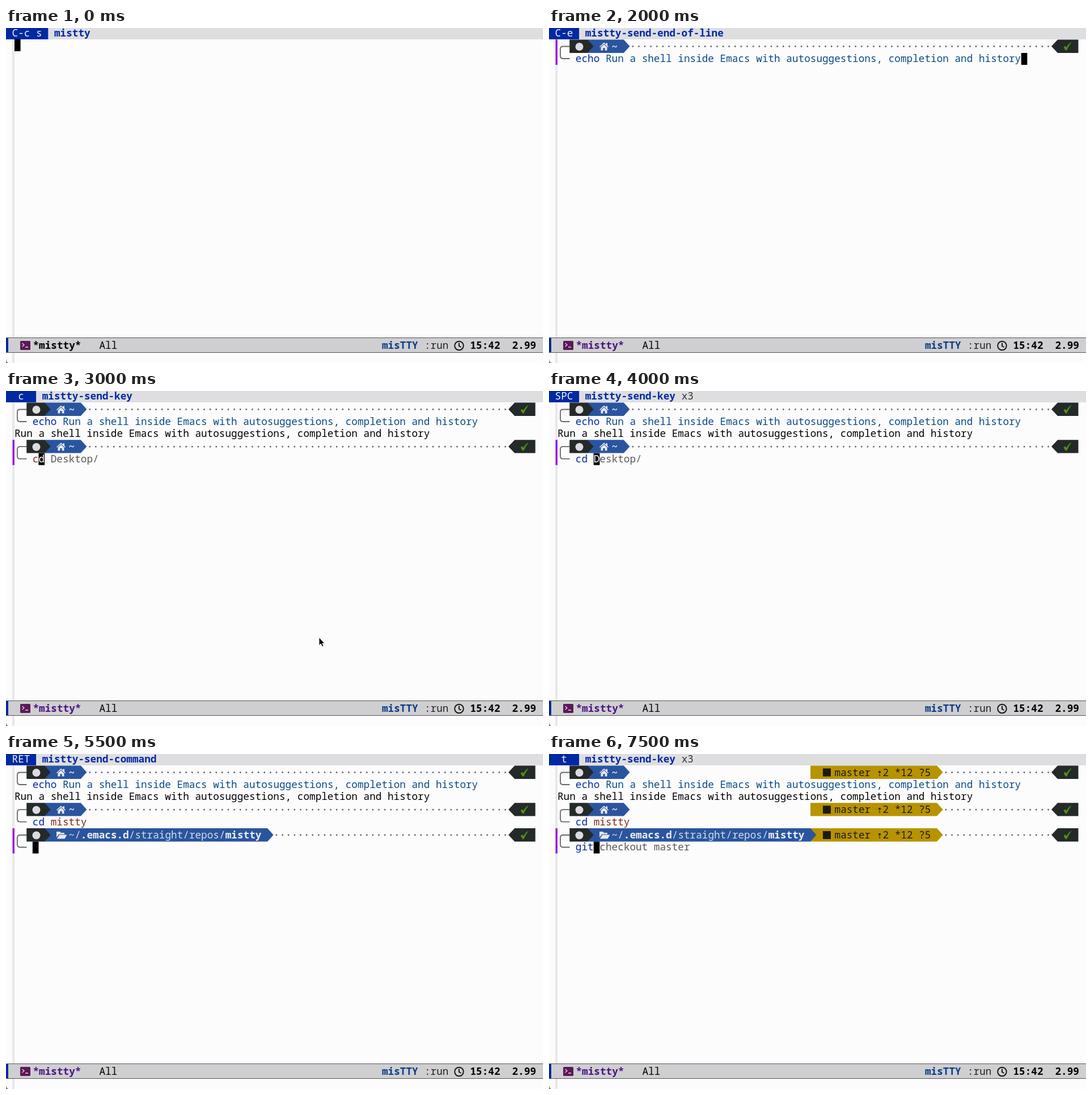
These frames come from a looping animation (947 by 591 pixels, 8000 ms). An HTML page:

```html
<!DOCTYPE html>
<html lang="en">
<head>
<meta charset="utf-8">
<title>Shell session</title>
<style>
  html, body { margin: 0; width: 100%; height: 100%; overflow: hidden; background: #fcfcfc; }
  svg { display: block; width: 947px; height: 591px; }
  text { font: 17.7px "Noto Sans Mono", "DejaVu Sans Mono", monospace; white-space: pre; }
  .b { font-weight: 700; }
</style>
</head>
<body>
<svg viewBox="0 0 947 591" xmlns="http://www.w3.org/2000/svg">
  <defs>
    <g id="house" fill="#e6e9ee">
      <path d="M0 8.5 L8 1 L11.5 4.2 V2 H14 V6.6 L16 8.5 L15 9.6 L8 3.2 L1 9.6Z"/>
      <path d="M2.5 9.5 L8 4.6 L13.5 9.5 V15 H9.7 V10.8 H6.3 V15 H2.5Z"/>
    </g>
    <g id="folder" fill="#e6e9ee">
      <path d="M0 12 V2 H6 L8 4 H14 V6.5 H4.5Z"/>
      <path d="M5.2 7.6 H18.5 L14.5 14.5 H0.9Z"/>
    </g>
  </defs>
  <rect width="947" height="591" fill="#fcfcfc"/>
  <rect x="11" y="20" width="4" height="571" fill="#e8e8ea"/>
  <rect width="947" height="20" fill="#dedee1"/>
  <g id="view"></g>
  <rect y="546" width="947" height="27" fill="#cfcfd1"/>
  <path d="M0 546.5H947M0 572.5H947" stroke="#55555a"/>
  <rect y="547" width="4" height="25" fill="#0029a3"/>
  <rect x="25" y="552" width="18" height="16" rx="1.5" fill="#5b1a57"/>
  <path d="M28.5 556l3.5 3-3.5 3M34 563h5" fill="none" stroke="#e4d8e4" stroke-width="1.3"/>
  <text id="buffer" class="b" x="47.5" y="566">*mistty*</text>
  <text x="164.5" y="566">All</text>
  <text class="b" x="663" y="566" fill="#0a3c85">misTTY</text>
  <text x="738" y="566" fill="#222">:run</text>
  <g fill="none" stroke="#111" stroke-width="1.9">
    <circle cx="799" cy="560.5" r="7.8"/>
    <path d="M799 555.5V561L802.5 563"/>
  </g>
  <text class="b" x="818.5" y="566">15:42</text>
  <text class="b" x="892.5" y="566">2.99</text>
  <path d="M0 584Q0.5 589 4 591H0Z" fill="#77778c"/>
  <path id="mouse" d="M552 434.5V449L555.3 446L557.6 451.3L560 450.2L557.8 445.2H562Z"
        fill="#000" stroke="#fff" stroke-width="1"/>
</svg>
<script>
const BLUE = '#0029a3', TEAL = '#0a4a86', RED = '#a01c30', RUST = '#86270f', GREY = '#595959';
const CHAR = 10.62, LEFT = 15;
const TOPS = [20.5, 86.2, 131];
const KEY = 'mistty-send-key';
const EOL = 'mistty-send-end-of-line', SEND = 'mistty-send-command';
const WORDS = 'Run a shell inside Emacs with autosuggestions, completion and history';
const ECHO = [['echo ', BLUE], [WORDS, TEAL]];
const CD = [['cd ', BLUE], ['mistty', RUST]];

// key, command, repeat count, prompts shown, typed runs, suggestion, git segment
const steps = [
  ['C-c s', 'mistty', 0, 0],
  ['C-c s', 'mistty', 0, 0],
  ['C-c s', 'mistty', 0, 1],
  ['c', KEY, 2, 1, [['ec', RED]], 'ho ' + WORDS],
  ['C-e', EOL, 0, 1, ECHO],
  ['RET', SEND, 0, 2],
  ['c', KEY, 0, 2, [['c', RED]], 'd Desktop/'],
  ['d', KEY, 2, 2, [['cd', BLUE]], ' Desktop/'],
  ['SPC', KEY, 3, 2, [['cd ', BLUE]], 'Desktop/'],
  ['m', KEY, 4, 2, [['cd ', BLUE], ['m', RUST]], 'istty'],
  ['C-e', EOL, 0, 2, CD],
  ['RET', SEND, 0, 3],
  ['RET', SEND, 0, 3, [], '', true],
  ['g', KEY, 0, 3, [['g', RED]], 'it checkout master', true],
  ['i', KEY, 2, 3, [['gi', RED]], 't checkout master', true],
  ['t', KEY, 3, 3, [['git', BLUE]], ' checkout master', true]
];

const $ = id => document.getElementById(id);
const col = n => LEFT + n * CHAR;
const text = (x, y, s, fill = '#000', bold = false) =>
  `<text x="${x}" y="${y}" fill="${fill}"${bold ? ' class="b"' : ''}>${s}</text>`;
const rect = (x, y, w, h, fill) =>
  `<rect x="${x}" y="${y}" width="${w}" height="${h}" fill="${fill}"/>`;
const path = (d, style) => `<path d="${d}" ${style}/>`;

function runs(c, y, list) {
  let out = '';
  for (const [s, fill, bold] of list) {
    out += text(col(c), y, s, fill, bold);
    c += s.length;
  }
  return out;
}

// Powerline block with its arrow in the column after "to"
const segment = (from, to, y, fill) =>
  path(`M${col(from)} ${y}H${col(to)}L${col(to + 1)} ${y + 11.7}L${col(to)} ${y + 23.4}H${col(from)}Z`, `fill="${fill}"`);

function prompt(y, inRepo, git) {
  const mid = y + 12, base = y + 18;
  const end = git ? 63 : inRepo ? 42 : 11;
  let out = path(`M36.5 ${mid}H24.5Q20 ${mid} 20 ${mid + 5}V${mid + 16.5}Q20 ${mid + 21.5} 24.5 ${mid + 21.5}H36.5`,
    'fill="none" stroke="#66666a" stroke-width="1.8"');
  if (git) {
    out += segment(42, 63, y, '#b89300') + rect(483, y + 5, 14, 14, '#1c1a10') +
      runs(46, base, [['master ', '#1c1a10'], ['⇡', '#1c1a10'], ['2 *12 ?5', '#1c1a10']]);
  }
  out += segment(5, inRepo ? 42 : 11, y, '#2a559e') + segment(2, 5, y, '#24292a');
  out += `<circle cx="53.5" cy="${mid + .5}" r="7" fill="#dcdcdf"/>`;
  out += `<use href="#${inRepo ? 'folder' : 'house'}" x="89" y="${y + 4}"/>`;
  out += runs(9, base, inRepo
    ? [['~/', '#d5deeb'], ['.emacs.d', '#eceff4', true], ['/straight/repos/', '#d5deeb'], ['mistty', '#eceff4', true]]
    : [['~', '#eceff4', true]]);
  out += path(`M${col(end + 1.5)} ${mid}H${col(81.6)}`,
    `stroke="#66666a" stroke-width="2.9" stroke-linecap="round" stroke-dasharray="0 ${CHAR}"`);
  out += path(`M886 ${y + 11.7}L897 ${y}H933.5V${y + 23.4}H897Z`, 'fill="#24292a"');
  out += path(`M907.5 ${mid + 1.5}L910.5 ${mid - 1}L912.5 ${mid + 2}Q916 ${mid - 5} 921.5 ${mid - 7.5}Q916 ${mid} 913 ${mid + 7}H911Z`,
    'fill="#4a9410"');
  return out;
}

function header(key, name, count) {
  const width = Math.max(5, key.length + 2);
  const start = (width - key.length) / 2 * CHAR;
  const nameX = (width + 1) * CHAR;
  return rect(0, 0, width * CHAR, 20, BLUE) + text(start, 15, key, '#f2f2f6') +
    text(nameX, 15, name, BLUE, true) +
    (count ? text(nameX + (name.length + 1) * CHAR, 15, 'x' + count, '#333') : '');
}

function draw(step) {
  const [key, name, count, shown, typed = [], hint = '', git] = steps[step];
  let out = header(key, name, count);
  if (!shown) out += rect(15, 20, 10.6, 21, '#000');
  for (let i = 0; i < shown; i++) {
    const y = TOPS[i], live = i === shown - 1, base = y + 39.3;
    if (live) out += rect(11.5, y, 3.5, 44.5, '#9a1be0');
    out += prompt(y, i === 2, git);
    if (!live) {
      out += runs(3, base, [ECHO, CD][i]);
      if (i === 0) out += text(LEFT, 81, WORDS);
      continue;
    }
    const at = 3 + typed.reduce((n, run) => n + run[0].length, 0);
    out += runs(3, base, typed) + rect(col(at), y + 23.5, CHAR, 21, '#000');
    if (hint) out += runs(at, base, [[hint[0], '#fff'], [hint.slice(1), GREY]]);
  }
  $('view').innerHTML = out;
  $('buffer').setAttribute('fill', shown ? '#4c1580' : '#000');
  $('mouse').style.display = step === 6 ? '' : 'none';
}

let last = -1;
function tick() {
  const step = Math.floor(performance.now() / 500) % steps.length;
  if (step !== last) draw(last = step);
  requestAnimationFrame(tick);
}
tick();
</script>
</body>
</html>
```
